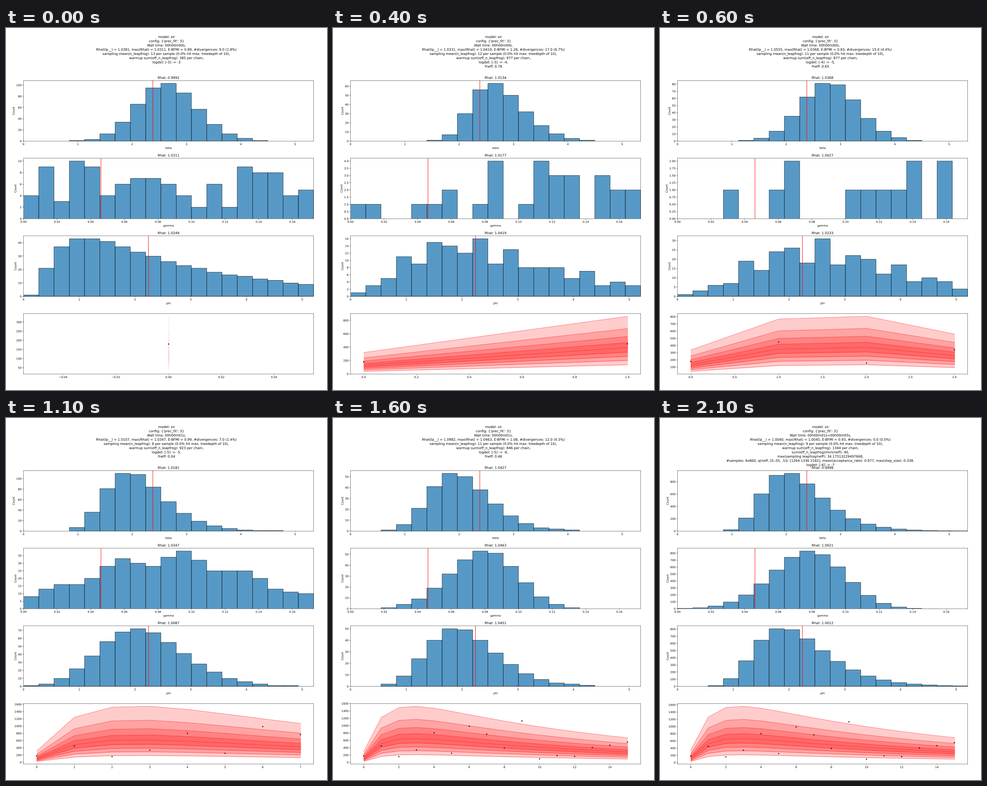
Animation of 706x794 px, one loop 2600 ms. Source, as a matplotlib script:

```python
import matplotlib.pyplot as plt
import numpy as np
from matplotlib import patheffects
from matplotlib.animation import FuncAnimation

W, H, DPI = 706, 794, 44.125
LEFT, RIGHT, TOP = 38.5, 676.6, 115.3
AX_H, PITCH = 132.8, 170.3
BINS = 19
TAB_BLUE = (31 / 255, 119 / 255, 180 / 255)

# Outlines without snapping keep thin lines and small text at subpixel places.
plt.rcParams.update({
    "font.family": "DejaVu Sans",
    "text.hinting": "none",
    "path.snap": False,
    "path.effects": [patheffects.Normal()],
})

# name, upper limit, true value, tick step
PARAMS = [("beta", 5.34, 2.38, 1),
          ("gamma", 0.17266, 0.0461, 0.02),
          ("phi", 5.205, 2.2414, 1)]

OBSERVED = [180, 450, 157, 340, 803, 250, 985, 767,
            390, 1128, 95, 185, 165, 405, 468, 553]

# normal scores of the 10% .. 90% quantiles
SCORES = np.array([-1.2816, -0.8416, -0.5244, -0.2533, 0,
                   0.2533, 0.5244, 0.8416, 1.2816])

scenes = []


def hump(top, mode, width, skew, ripple=0, period=1, crest=0):
    """Skewed bell of bin counts with its highest bar at top."""
    k = np.arange(BINS)
    base = np.maximum(1 + skew * (k - mode) / width, 1e-9)
    n = np.exp(-0.5 * (np.log(base) / skew) ** 2)
    n *= 1 + ripple * np.cos(2 * np.pi * (k - crest) / period)
    return np.rint(top * n / n.max())


def epidemic(days, size, decay, rise, start):
    """Fast rise from the start value, then a slow decay."""
    t = np.arange(days)
    return size * np.exp(-decay * t) - (size - start) * np.exp(-rise * t)


def fan(median, spread):
    """Nine quantile curves around the median, widest at the start."""
    t = np.arange(len(median))
    s = spread + 0.12 * np.exp(-2 * t)
    z = SCORES[:, None]
    return np.array(median) * np.exp(s * z - 0.08 * z ** 2)


def add_scene(wall, stats, leapfrog, tail, rhats, hists, quantiles):
    lines = ["model: sir", "config: {'prec_fit': 3}", f"Wall time: {wall},",
             "Rhat(lp__) = {}, max(Rhat) = {}, E-BFMI = {}, "
             "#divergences: {}".format(*stats),
             f"sampling mean(n_leapfrog): {leapfrog} per sample "
             "(0.0% hit max. treedepth of 10),"] + tail
    scenes.append((lines, rhats, hists, quantiles))


def warmup(total, *rest):
    return [f"warmup sum(eff_n_leapfrog): {total} per chain,", *rest]


add_scene(
    "00h00m00s", ("1.0381", "1.0311", "0.89", "9.0 (1.8%)"), 13,
    warmup(385, "logdet: [-3] -> -3"),
    ("0.9992", "1.0311", "1.0249"),
    [hump(103, 8.8, 1.95, 0.05),
     [4, 9, 3, 10, 9, 4, 6, 7, 7, 6, 4, 2, 6, 2, 9, 8, 8, 4, 5],
     hump(43, 3.5, 3.4, 0.9)],
    fan([115], 0.81))

add_scene(
    "00h00m00s", ("1.0331", "1.0419", "1.28", "17.0 (6.7%)"), 12,
    warmup(977, "logdet: [-3] -> -4,", "fneff: 0.78"),
    ("1.0134", "1.0177", "1.0419"),
    [hump(63, 8.8, 1.65, 0.2),
     [1, 1, 0, 0, 1, 1, 2, 0, 1, 4, 0, 1, 4, 3, 3, 0, 3, 2, 2],
     hump(16, 6.2, 4.3, 0.5, 0.25, 2.4, 3)],
    fan([128, 393], 0.7))

add_scene(
    "00h00m00s", ("1.0555", "1.0368", "0.83", "15.0 (4.4%)"), 11,
    warmup(877, "logdet: [-4] -> -5,", "fneff: 0.65"),
    ("1.0368", "1.0027", "1.0233"),
    [hump(81, 9.4, 1.85, 0.03),
     np.bincount([3, 6, 7, 7, 11, 12, 13, 14, 15, 15, 17, 17]),
     hump(31, 8, 4.5, 0.3, 0.3, 2.5, 4)],
    fan([135, 350, 374, 260], 0.7))

add_scene(
    "00h00m01s", ("1.0107", "1.0347", "0.99", "7.0 (1.4%)"), 8,
    warmup(923, "logdet: [-5] -> -5,", "fneff: 0.04"),
    ("1.0181", "1.0347", "1.0087"),
    [hump(110, 6.4, 1.9, 0.25),
     hump(38, 9, 5.5, 0.01, 0.15, 4.3, 10),
     hump(72, 6.9, 2.75, 0.12)],
    fan(epidemic(8, 1000, 0.12, 0.8, 108), 0.82))

add_scene(
    "00h00m01s", ("1.0982", "1.0463", "1.08", "12.0 (4.3%)"), 11,
    warmup(846, "logdet: [-5] -> -6,", "fneff: 0.46"),
    ("1.0427", "1.0463", "1.0451"),
    [hump(53, 6.3, 1.9, 0.2),
     hump(53, 8.3, 2.2, -0.05),
     hump(50, 6.4, 2.2, 0.2)],
    fan(epidemic(16, 865, 0.074, 0.95, 108), 0.77))

add_scene(
    "00h00m01s+00h00m05s", ("1.0040", "1.0045", "0.93", "0.0 (0.0%)"), 9,
    warmup(1344, "sum(eff_n_leapfrog)/min(neff): 40,",
           "max(sampling leapfrog/neff): 34.17513229497668,",
           "#samples: 6x800, q(neff, [0,.05, .5]): [1264 1336 2182], "
           "mean(acceptance_rate): 0.977, max(step_size): 0.338,",
           "logdet: [-6] -> -7"),
    ("0.9998", "1.0021", "1.0012"),
    [hump(934, 6.6, 1.91, 0.29),
     hump(830, 8.15, 2.35, -0.05),
     hump(805, 6.4, 2.25, 0.3)],
    fan(epidemic(16, 880, 0.073, 0.95, 125), 0.77))

fig = plt.figure(figsize=(W / DPI, (H + 0.001) / DPI), dpi=DPI,
                 facecolor="white")


def add_panel(row):
    bottom = H - (TOP + PITCH * row + AX_H)
    return fig.add_axes([LEFT / W, bottom / H, (RIGHT - LEFT) / W, AX_H / H])


def draw_header(lines):
    for i, line in enumerate(lines):
        fig.text(0.5, 1 - (22 + 9.26 * i) / H, line, fontsize=12,
                 ha="center", va="baseline")


def draw_hist(ax, param, rhat, counts):
    name, upper, truth, step = param
    counts = np.asarray(counts)
    width = upper / BINS
    filled = np.flatnonzero(counts)
    ax.bar(filled * width, counts[filled], width, align="edge",
           facecolor=(*TAB_BLUE, 0.75), edgecolor="black", linewidth=1)
    ax.axvline(truth, color="red", linewidth=1.5)
    ax.set_xlim(0, upper)
    ax.set_ylim(0, 1.05 * counts.max())
    ax.set_xticks(np.arange(int(upper / step) + 1) * step)
    ax.set_xlabel(name)
    ax.set_ylabel("Count")
    ax.set_title(f"Rhat: {rhat}")


def draw_bands(ax, q):
    t = np.arange(q.shape[1])
    for k in range(4):
        ax.fill_between(t, q[k], q[8 - k], color="red", alpha=0.2)
    for row in q:
        ax.plot(t, row, color="red", alpha=0.45, linewidth=1.5)
    ax.plot(t, OBSERVED[:len(t)], "k.")
    low, high = q.min(), q.max()
    pad = 0.05 * (high - low)
    ax.set_ylim(low - pad, high + pad)
    span = 0.05 * t[-1] if len(t) > 1 else 0.055
    ax.set_xlim(-span, t[-1] + span)


def update(i):
    # the first scene lasts one tick, the others five each
    lines, rhats, hists, q = scenes[(i + 4) // 5]
    fig.clear()
    draw_header(lines)
    for row, (param, rhat, counts) in enumerate(zip(PARAMS, rhats, hists)):
        draw_hist(add_panel(row), param, rhat, counts)
    draw_bands(add_panel(3), q)
    return []


anim = FuncAnimation(fig, update, frames=26, interval=100, repeat=True,
                     repeat_delay=0, init_func=lambda: update(0))
plt.show()
```
